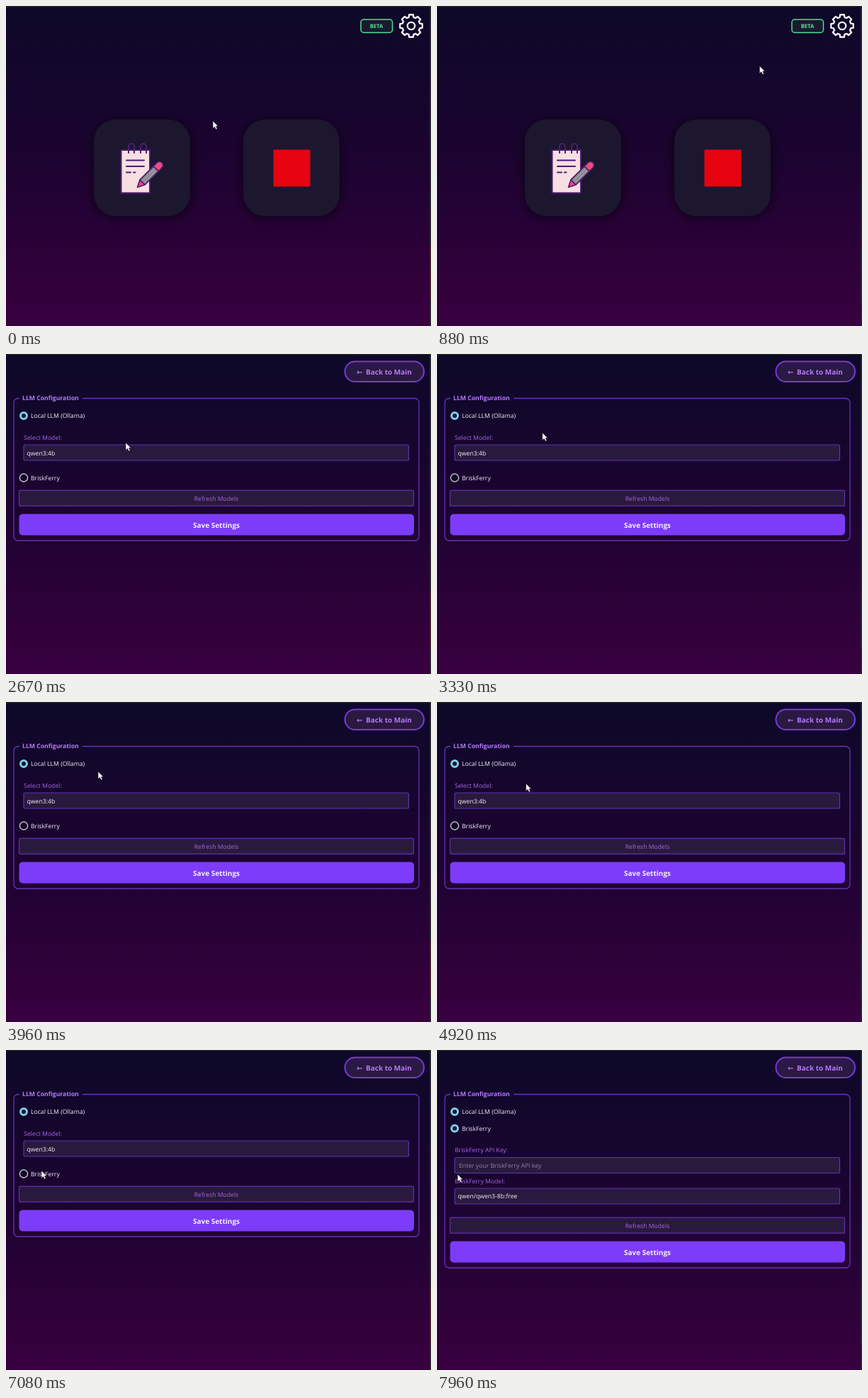
These frames come from a looping animation (600 px wide and 451 px high, 8000 ms). An HTML page:

```html
<!DOCTYPE html>
<html lang="en">
<head>
<meta charset="utf-8">
<title>Model settings</title>
<style>
  html, body { margin: 0; width: 100%; height: 100%; overflow: hidden; background: #1c0430; }
  svg { display: block; width: 600px; height: 451px; }
  text { font: 8.66px "Open Sans", "Noto Sans", sans-serif; fill: #f4f0fa; text-rendering: geometricPrecision; }
  .bold { font-weight: 700; }
  .big { font-size: 10px; }
  .mid { text-anchor: middle; }
  .label { fill: #a765e3; }
  .title { fill: #b678ff; }
  .hint { fill: #90839d; }
  .field { fill: #291a3d; stroke: #6131b5; stroke-width: 1.2; }
  .card { fill: #1e172d; filter: url(#shadow); }
  .ink { fill: none; stroke: #4c1c70; stroke-width: 2; stroke-linecap: round; stroke-linejoin: round; }
</style>
</head>
<body>
<svg viewBox="0 0 600 451">
  <defs>
    <linearGradient id="sky" x2="0" y2="1">
      <stop stop-color="#0d0928"/>
      <stop offset=".5" stop-color="#1d0331"/>
      <stop offset="1" stop-color="#38003f"/>
    </linearGradient>
    <filter id="shadow" x="-30%" y="-30%" width="160%" height="160%">
      <feDropShadow dx="0" dy="2" stdDeviation="9" flood-color="#05010c" flood-opacity=".65"/>
    </filter>
    <g id="on">
      <circle r="4.5" fill="#101a35" stroke="#83cbe4" stroke-width="3"/>
    </g>
    <circle id="off" r="5.6" fill="#140726" stroke="#eee8f5" stroke-width="1.1"/>
  </defs>

  <rect width="600" height="451" fill="url(#sky)"/>
  <rect width="600" height="1.5" fill="#222124"/>
  <rect x="598" width="2" height="451" fill="#29232f"/>
  <rect x="599" y="336" width="1" height="80" fill="#5a1c30"/>

  <g id="home">
    <rect class="card" x="124" y="160" width="136" height="136" rx="31"/>
    <rect class="card" x="335" y="160" width="136" height="136" rx="31"/>
    <rect x="377.5" y="202.500" width="52" height="52" fill="#e60410"/>

    <rect class="ink" x="162.500" y="203" width="40.500" height="60.500" style="fill:#f8dfe2"/>
    <path class="ink" d="M173 207V198a4 4 0 0 1 8 0V207M190 207V198a4 4 0 0 1 8 0V207"/>
    <path class="ink" d="M170 217.500H195M170 226H195M170 234.500H176M180 234.500H182.500"/>
    <g transform="translate(185.500 255.500) rotate(-45)" stroke="#4c1c70" stroke-width="1.6" stroke-linejoin="round">
      <path d="M0 0L10 -5V5Z" fill="#ef4584"/>
      <path d="M10 -5H37V5H10Z" fill="#85838d"/>
      <path d="M11 -1.500H36M11 2H36" stroke="#aaa7b0" stroke-width="1.2"/>
      <path d="M37 -5H44a5 5 0 0 1 0 10H37Z" fill="#f04b78"/>
    </g>

    <rect x="501" y="19" width="44.500" height="18.500" rx="4" fill="#191a30" stroke="#53df8c" stroke-width="1.5"/>
    <text class="bold mid" x="523" y="31" style="font-size:7.6px;fill:#55e98e">BETA</text>
    <circle id="hover" cx="572" cy="28" r="18" fill="#302b38"/>
    <g transform="translate(572 28)" fill="none" stroke="#f5f3f7" stroke-width="2.3" stroke-linejoin="round">
      <path id="gear"/>
      <circle r="5.2"/>
    </g>
  </g>

  <g id="settings">
    <rect x="478.500" y="10.500" width="111.500" height="28.500" rx="14.200" fill="#2a1941" stroke="#7538e0" stroke-width="2"/>
    <text class="bold big title" x="495" y="28.500" style="font-family:'DejaVu Sans',sans-serif">←</text>
    <text class="bold big title" x="508" y="28.500">Back to Main</text>

    <path id="frame" fill="none" stroke="#6533b8" stroke-width="1.3"/>
    <text class="bold title" x="23" y="64.700">LLM Configuration</text>
    <use href="#on" x="25" y="87"/>
    <text x="35" y="90.200">Local LLM (Ollama)</text>

    <g id="local">
      <text class="label" x="25" y="120.500">Select Model:</text>
      <rect class="field" x="25" y="128" width="543.500" height="22" rx="2"/>
      <text x="29.500" y="142.700">qwen3:4b</text>
      <use href="#off" x="25" y="174.500"/>
      <text x="35" y="177.700">BriskFerry</text>
    </g>

    <g id="remote">
      <use href="#on" x="25" y="110.500"/>
      <text x="35" y="113.700">BriskFerry</text>
      <text class="label" x="25" y="144">BriskFerry API Key:</text>
      <rect class="field" x="25" y="151.500" width="543.500" height="22" rx="2"/>
      <text class="hint" x="31" y="165.700">Enter your BriskFerry API key</text>
      <text class="label" x="25" y="188">BriskFerry Model:</text>
      <rect class="field" x="25" y="195" width="543.500" height="22" rx="2"/>
      <text x="29.500" y="209.200">qwen/qwen3-8b:free</text>
    </g>

    <g id="actions">
      <rect class="field" x="18.500" y="192.200" width="557" height="22" rx="2"/>
      <text class="label mid" x="297" y="206.500">Refresh Models</text>
      <rect x="18.500" y="225.500" width="557.500" height="30" rx="5" fill="#7c3cfa"/>
      <text class="bold big mid" x="297" y="244.600">Save Settings</text>
    </g>
  </g>

  <path id="cursor" d="M0 0V10.500L2.500 8.300L4.300 12L6.200 11.100L4.500 7.600H7.500Z" fill="#fff" stroke="#15101c" stroke-width=".6"/>
</svg>
<script>
const LOOP = 8000, OPEN_SETTINGS = 1900, PICK_REMOTE = 7600;
// time, x, y of the pointer tip
const PATH = [
  [0, 292, 162], [300, 300, 154], [1350, 568, 34], [1950, 568, 34],
  [2670, 169, 125], [3960, 130, 98], [4700, 124, 112], [5790, 139, 140],
  [7080, 50, 170], [7500, 29, 175], [LOOP, 29, 175]
];
const el = id => document.getElementById(id);
const show = (id, on) => el(id).style.display = on ? '' : 'none';

function gearPath(teeth, inner, outer) {
  const points = [];
  for (let i = 0; i < teeth; i++) {
    for (const [r, offset] of [[inner, -.27], [outer, -.18], [outer, .18], [inner, .27]]) {
      const a = i / teeth * 2 * Math.PI + offset;
      points.push(`${r * Math.cos(a)} ${r * Math.sin(a)}`);
    }
  }
  return `M${points.join('L')}Z`;
}

function pointerAt(t) {
  const i = PATH.findIndex(p => p[0] > t);
  const [t0, x0, y0] = PATH[i - 1], [t1, x1, y1] = PATH[i];
  const k = (t - t0) / (t1 - t0), e = k * k * (3 - 2 * k);
  return [x0 + (x1 - x0) * e, y0 + (y1 - y0) * e];
}

function draw(now) {
  const t = now % LOOP;
  const open = t >= OPEN_SETTINGS, remote = t >= PICK_REMOTE;
  const shift = remote ? 44 : 0;
  const [x, y] = pointerAt(t);
  show('home', !open);
  show('settings', open);
  show('local', !remote);
  show('remote', remote);
  show('hover', Math.hypot(x - 572, y - 28) < 18);
  el('actions').setAttribute('transform', `translate(0 ${shift})`);
  el('frame').setAttribute('d',
    `M108 62.5H577a6 6 0 0 1 6 6V${257 + shift}a6 6 0 0 1 -6 6H17a6 6 0 0 1 -6 -6V68.500a6 6 0 0 1 6 -6H19`);
  el('cursor').setAttribute('transform', `translate(${x} ${y})`);
  requestAnimationFrame(draw);
}

el('gear').setAttribute('d', gearPath(8, 12.6, 16));
draw(0);
</script>
</body>
</html>
```
